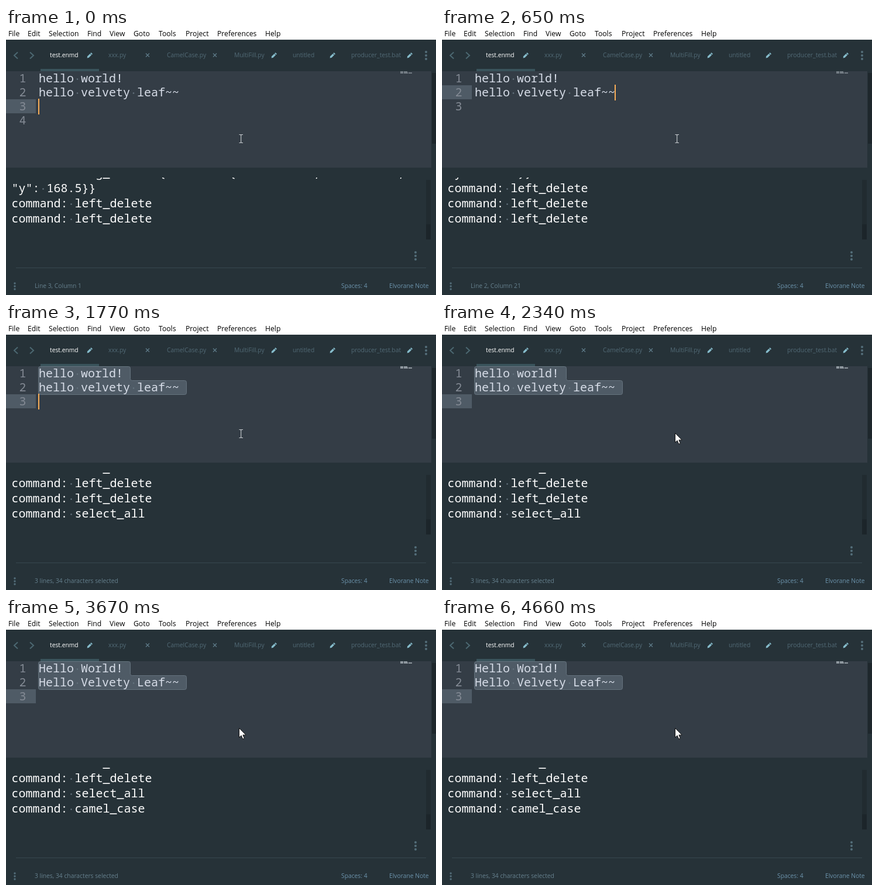
These frames come from a looping animation (735 px wide and 457 px high, 5160 ms). An HTML page:

```html
<!DOCTYPE html>
<html lang="en">
<head>
<meta charset="utf-8">
<title>Camel case command</title>
<style>
  html, body { margin: 0; width: 100%; height: 100%; overflow: hidden; background: #263238; }
  svg { display: block; width: 735px; height: 457px; }
  text { white-space: pre; }
  .menu { font: 12.2px "Open Sans", "Noto Sans", sans-serif; fill: #000; }
  .ui { font: 10.3px "Open Sans", "Noto Sans", sans-serif; fill: #526a76; }
  .ui.active { fill: #fff; font-weight: 500; }
  .ui.status { fill: #66808e; }
  .ui.link { fill: #6c93ac; }
  .mono { font: 20px "Noto Sans Mono", "DejaVu Sans Mono", monospace; }
  .code { fill: #d8dee9; }
  .log { fill: #fff; }
  .num { fill: #848b95; }
  .space { fill: #65737e; }
</style>
</head>
<body>
<svg viewBox="0 0 735 457" xmlns="http://www.w3.org/2000/svg">
  <defs>
    <clipPath id="panel"><rect x="0" y="256" width="716" height="110"/></clipPath>
  </defs>
  <rect width="735" height="457" fill="#263238"/>
  <rect width="735" height="20" fill="#fff"/>
  <rect x="59" y="70" width="100" height="4" fill="#3a545c"/>
  <rect y="74" width="727" height="165" fill="#343d46"/>
  <rect x="728" y="77" width="7" height="121" fill="#1e272c"/>
  <rect x="718" y="260" width="8" height="102" fill="#212b30"/>
  <rect x="718" y="336" width="8" height="26" fill="#1c252a"/>
  <path d="M17 410.5H718" stroke="#37474f"/>
  <g id="chrome"></g>
  <rect id="row" width="51" height="24" fill="#4f5b66"/>
  <path id="selection" fill="#4f5b66" stroke="#65737e"
    d="M58.5 74.5H209.5Q212.5 74.5 212.5 77.5V95.5Q212.5 98.5 215.5 98.5H305.5Q308.5 98.5 308.5 101.5V119.5Q308.5 122.5 305.5 122.5H58.5Q55.5 122.5 55.5 119.5V77.5Q55.5 74.5 58.5 74.5Z"/>
  <path id="minimap" d="M674 74h5v2h-5zm6 0h6v2h-6zm-6 2h5v2h-5zm6 0h7v2h-7zm8 0h6v2h-6z"/>
  <g id="editor"></g>
  <g id="console" clip-path="url(#panel)"></g>
  <rect id="caret" width="2" height="27" fill="#f9ae58"/>
  <path id="beam" d="M398.5 182.5h2.2l1 1 1-1h2.3M401.7 183.5v12M398.5 196.5h2.2l1-1 1 1h2.3" fill="none" stroke="#c9ced2" stroke-width="1.1"/>
  <path id="arrow" d="M398.5 188.5V204.5L402.2 201.2L404.7 207.2L407.4 206L404.9 200.2H410Z" fill="#fff" stroke="#111"/>
</svg>
<script>
const LOOP = 5160;
const $ = id => document.getElementById(id);
const esc = s => String(s).replace(/&/g, "&amp;").replace(/</g, "&lt;");
const label = (s, x, y, cls) => `<text x="${x}" y="${y}" class="${cls}">${esc(s)}</text>`;

// Monospaced text with a dot for each space.
function code(s, x, y, cls) {
  const dots = [...s].map((c, i) => c === " "
    ? `<circle class="space" cx="${x + 12 * i + 6}" cy="${y - 5.5}" r="1.3"/>` : "");
  return label(s, x, y, "mono " + cls) + dots.join("");
}

const pencil = x => `<g transform="translate(${x} 47) rotate(-45)" fill="#86bccb">
  <path d="M-6.2 0L-3.6 -1.7H2.6V1.7H-3.6Z"/><path d="M3.4 -1.7H5.4V1.7H3.4Z"/></g>`;
const cross = x => `<path d="M${x - 3} 43.5l6 6m0 -6l-6 6" stroke="#607d8b" stroke-width="1.2"/>`;
const chevron = (x, d) => `<path d="M${x - 3 * d} 41.5l${6 * d} 5.5l${-6 * d} 5.5" fill="none" stroke="#4c6871" stroke-width="2"/>`;
const kebab = (x, y, gap, r) => [-gap, 0, gap]
  .map(d => `<circle cx="${x}" cy="${y + d}" r="${r}" fill="#546e7a"/>`).join("");

const menus = [["File", 4], ["Edit", 37], ["Selection", 73], ["Find", 139], ["View", 177],
  ["Goto", 218], ["Tools", 261], ["Project", 307], ["Preferences", 361], ["Help", 443]];
const tabs = [["test.enmd", 75], ["xxx.py", 175], ["CamelCase.py", 275],
  ["MultiFill.py", 390], ["untitled", 490], ["producer_test.bat", 590]];

$("chrome").innerHTML = [
  ...menus.map(([s, x]) => label(s, x, 14, "menu")),
  ...tabs.map(([s, x], i) => label(s, x, 50, i ? "ui" : "ui active")),
  ...[143, 458, 558, 690].map(pencil),
  ...[242, 357].map(cross),
  chevron(17, -1), chevron(44, 1),
  kebab(718, 47, 6, 2), kebab(700, 390, 6, 2), kebab(15, 442, 5, 1.7),
  `<text id="status" x="49" y="445" class="ui status"></text>`,
  label("Spaces: 4", 573, 445, "ui link"),
  label("Elvorane Note", 655, 445, "ui link")
].join("");

const lower = ["hello world!", "hello velvety leaf~~"];
const title = lower.map(s => s.replace(/\b[a-z]/g, c => c.toUpperCase()));
const del = "command: left_delete";
const log = [
  'command: drag_select {"event": {"button": 1, "x": 234.5,',
  '"y": 168.5}}', del, del, del, "command: select_all", "command: camel_case"
];
const selected = "3 lines, 34 characters selected";

const stages = [
  { at: 0, text: lower, rows: 4, row: 3, caret: 55, log: log.slice(0, 4), status: "Line 3, Column 1" },
  { at: 650, text: lower, rows: 3, row: 2, caret: 295, log: log.slice(1, 5), status: "Line 2, Column 21" },
  { at: 1770, text: lower, rows: 3, row: 3, caret: 55, log: [del, ...log.slice(3, 6)], status: selected, all: true },
  { at: 3050, text: title, rows: 3, row: 3, caret: 55, log: [del, ...log.slice(4, 7)], status: selected, all: true }
];

// Caret opacity: [time, value], held until the next entry.
const blink = [
  [0, 1], [150, .8], [330, .45], [390, .2], [520, 0],
  [650, 1], [1010, .5], [1150, .06],
  [1770, 1], [2080, .85], [2220, .4], [2340, 0], [2780, .5], [2840, 1],
  [3410, .8], [3530, .4], [3670, 0],
  [4100, .4], [4160, .8], [4220, 1], [4460, .85], [4530, .55], [4600, .25], [4660, 0]
];

const show = (id, on) => $(id).setAttribute("visibility", on ? "visible" : "hidden");
let current;

function setStage(s) {
  current = s;
  const top = 74 + 24 * (s.row - 1);
  $("row").setAttribute("y", top);
  $("caret").setAttribute("x", s.caret);
  $("caret").setAttribute("y", top - 1);
  show("selection", s.all);
  $("minimap").setAttribute("fill", s.all ? "#8f989f" : "#737c84");
  $("status").textContent = s.status;
  const nums = Array.from({ length: s.rows }, (_, i) => label(i + 1, 22.5, 93 + 24 * i, "mono num"));
  $("editor").innerHTML = nums.join("") + s.text.map((t, i) => code(t, 56, 93 + 24 * i, "code")).join("");
  $("console").innerHTML = s.log.map((t, i) => code(t, 9.5, 255 + 26 * i, "log")).join("");
}

function draw(t) {
  const stage = stages.findLast(s => s.at <= t);
  if (stage !== current) setStage(stage);
  $("caret").setAttribute("opacity", blink.findLast(b => b[0] <= t)[1]);
  show("beam", t < 1830);
  show("arrow", t >= 1830);
}

const start = performance.now();
function tick() {
  draw((performance.now() - start) % LOOP);
  requestAnimationFrame(tick);
}
tick();
</script>
</body>
</html>
```
